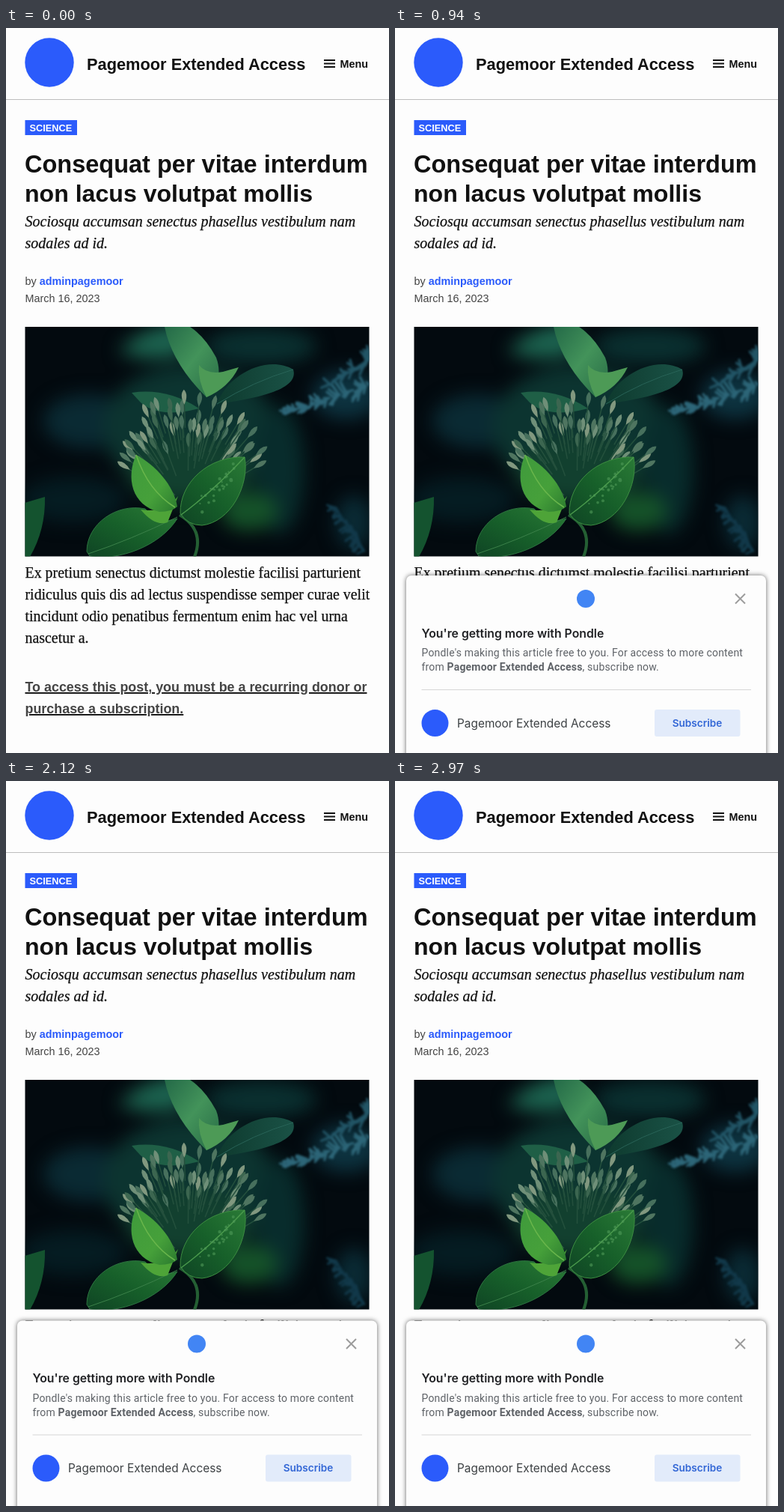
An HTML page that plays this animation: 512 px wide and 968 px high, repeating every 3 s.

```html
<!DOCTYPE html>
<html lang="en">
<head>
<meta charset="utf-8">
<title>Extended access prompt</title>
<style>
  html, body { margin: 0; width: 100%; height: 100%; overflow: hidden; background: #fdfdfd; }
  svg { display: block; }
  text { fill: #111; font: 14.4px "Liberation Sans", Arial, sans-serif; white-space: pre; }
  .b { font-weight: 700; }
  .serif { font: 19.9px "Liberation Serif", Georgia, serif; stroke: #111; stroke-width: .25; }
  .lead { font-size: 20px; font-style: italic; }
  .note { font: 14px Roboto, sans-serif; letter-spacing: .18px; fill: #5f6368; }
  .ui { font: 600 15.8px Inter, sans-serif; fill: #202124; }
  .soft { filter: blur(12px); }
  .hazy { filter: blur(1.8px); }
  #panel { filter: drop-shadow(0 0 3px rgba(0,0,0,.6)); }
  #bubble { filter: drop-shadow(0 0 9px rgba(0,0,0,.13)); }
</style>
</head>
<body>
<svg width="512" height="968" viewBox="0 0 512 968">
  <defs>
    <clipPath id="frame"><rect x="25.5" y="399" width="460" height="306.5"/></clipPath>
    <linearGradient id="bright" x2="1" y2="1"><stop stop-color="#3f9a3c"/><stop offset=".6" stop-color="#46a03a"/><stop offset="1" stop-color="#2a7a2e"/></linearGradient>
    <linearGradient id="deep" x1="1" y1="0" x2="0" y2="1"><stop stop-color="#2a7a36"/><stop offset=".5" stop-color="#17602a"/><stop offset="1" stop-color="#0f4424"/></linearGradient>
    <linearGradient id="pale" x2="1" y2="1"><stop stop-color="#246a48"/><stop offset=".5" stop-color="#43935a"/><stop offset="1" stop-color="#276b45"/></linearGradient>
    <linearGradient id="dusk" x2="1"><stop stop-color="#0e3a2e"/><stop offset="1" stop-color="#1a5246"/></linearGradient>
  </defs>

  <!-- header -->
  <circle cx="58" cy="46" r="32.7" fill="#2b5bfb"/>
  <text class="b" x="108" y="56" style="font-size:21.8px">Pagemoor Extended Access</text>
  <path d="M425 43h15M425 47.5h15M425 52h15" stroke="#111" stroke-width="1.8"/>
  <text class="b" x="446.5" y="53">Menu</text>
  <path d="M0 95.5H512" stroke="#bdbdbd"/>

  <!-- article -->
  <rect x="25.5" y="123" width="69.5" height="20" fill="#2b5bfb"/>
  <text class="b" x="31.5" y="138" style="font-size:12.8px;fill:#fff">SCIENCE</text>
  <text class="b" x="25" y="193" style="font-size:32.5px">Consequat per vitae interdum</text>
  <text class="b" x="25" y="232" style="font-size:32.1px">non lacus volutpat mollis</text>
  <text class="serif lead" x="25.5" y="265">Sociosqu accumsan senectus phasellus vestibulum nam</text>
  <text class="serif lead" x="25.5" y="294">sodales ad id.</text>
  <text x="25.5" y="343" style="fill:#444">by <tspan class="b" fill="#2b5bfb">adminpagemoor</tspan></text>
  <text x="25.5" y="366" style="fill:#444">March 16, 2023</text>

  <!-- plant picture -->
  <g clip-path="url(#frame)">
    <rect x="25" y="399" width="462" height="308" fill="#030a0f"/>
    <g class="soft">
      <ellipse cx="110" cy="525" rx="60" ry="36" fill="#0a2a33"/>
      <ellipse cx="90" cy="630" rx="70" ry="30" fill="#051c22"/>
      <ellipse cx="245" cy="535" rx="115" ry="85" fill="#0c3430"/>
      <ellipse cx="245" cy="590" rx="85" ry="45" fill="#12402f"/>
      <ellipse cx="365" cy="590" rx="34" ry="85" fill="#082c2c"/>
      <ellipse cx="325" cy="645" rx="38" ry="26" fill="#155229"/>
      <ellipse cx="340" cy="425" rx="75" ry="24" fill="#0a3030"/>
      <ellipse cx="455" cy="490" rx="45" ry="32" fill="#0d3340"/>
      <ellipse cx="465" cy="660" rx="24" ry="36" fill="#0a2b35"/>
      <path d="M150 432Q190 392 240 396L242 434Q200 450 150 432Z" fill="#1c6450"/>
    </g>
    <g id="sprigs" class="hazy" stroke-width="3" stroke-linecap="round"></g>
    <path d="M25 634L52 626Q53 670 32 706H25Z" fill="#14532f"/>
    <path d="M212 399Q222 448 268 493Q292 470 281 440Q266 412 246 399Z" fill="url(#pale)"/>
    <path d="M258 450Q268 463 290 459L311 453Q298 480 268 493Q256 470 258 450Z" fill="#4d9a56"/>
    <path d="M282 502C296 462 350 436 384 456C392 482 340 494 282 502Z" fill="url(#dusk)"/>
    <path d="M282 502Q330 472 384 456" fill="none" stroke="#286357"/>
    <path d="M168 487Q215 480 258 508Q205 522 180 500Z" fill="#1f5f46"/>
    <g id="buds"></g>
    <path d="M232 650Q266 670 252 706" fill="none" stroke="#245f33" stroke-width="4"/>
    <path d="M108 699C108 662 148 634 186 642Q205 664 229 655C206 692 150 712 112 705Z" fill="url(#deep)" stroke="#2d7440"/>
    <path d="M110 702Q165 684 229 653" fill="none" stroke="#3b8149"/>
    <path d="M180 643Q199 666 216 660L230 625Q214 648 180 643Z" fill="#4ea438"/>
    <path d="M174 570C160 600 168 638 205 646Q222 646 229 639C224 610 200 584 174 570Z" fill="url(#bright)"/>
    <path d="M174 570Q190 618 226 640" fill="none" stroke="#69b64b" stroke-width="1.5"/>
    <path d="M233 648C232 608 270 571 319 573C326 610 300 660 262 664Q243 664 233 648Z" fill="url(#deep)" stroke="#3c8d40"/>
    <path d="M234 650Q275 620 319 573" fill="none" stroke="#4a9a4c" stroke-width="1.5"/>
    <g id="drops" fill="#4f9a58" opacity=".6"></g>
  </g>

  <g>
    <text class="serif" x="25.5" y="734">Ex pretium senectus dictumst molestie facilisi parturient</text>
    <text class="serif" x="25.5" y="763">ridiculus quis dis ad lectus suspendisse semper curae velit</text>
    <text class="serif" x="25.5" y="792">tincidunt odio penatibus fermentum enim hac vel urna</text>
    <text class="serif" x="25.5" y="821">nascetur a.</text>
  </g>
  <g text-decoration="underline">
    <text class="b" x="25.5" y="886" style="font-size:17.9px;fill:#444">To access this post, you must be a recurring donor or</text>
    <text class="b" x="25.5" y="915" style="font-size:17.9px;fill:#444">purchase a subscription.</text>
  </g>

  <!-- sheet, drawn from its own top edge -->
  <g id="sheet">
    <rect id="panel" x="15" y="0" width="481" height="300" rx="7" fill="#fdfdfd"/>
    <path id="spinner" d="M261.3 68.7A12.5 12.5 0 0 1 268.5 80" fill="none" stroke="#3f7be0" stroke-width="3"/>
    <g id="offer">
      <circle cx="255" cy="31" r="12" fill="#4285f4"/>
      <path d="M455 24.5l13 13m0-13l-13 13" stroke="#9c9c9c" stroke-width="2"/>
      <text class="ui" x="35.5" y="82.5">You're getting more with Pondle</text>
      <text class="note" x="35.5" y="108">Pondle's making this article free to you. For access to more content</text>
      <text class="note" x="35.5" y="127">from <tspan class="b">Pagemoor Extended Access</tspan>, subscribe now.</text>
      <path d="M35.5 152.5H476" stroke="#d6d6d6"/>
      <circle cx="53.5" cy="197" r="18" fill="#2b5bfb"/>
      <text class="ui" x="83" y="202.5" style="font-size:15.4px;font-weight:400;fill:#3c4043">Pagemoor Extended Access</text>
      <rect x="347" y="179" width="114.5" height="36" rx="3" fill="#e2ebfa"/>
      <text class="ui" x="404" y="201.5" text-anchor="middle" style="font-size:13.6px;fill:#3367d6">Subscribe</text>
    </g>
  </g>

  <g id="status">
    <path id="bubble" d="M-20 926.5H160Q167.5 926.5 167.5 934V990H-20Z" fill="#7a9fe6" stroke="#2c3a55"/>
    <text x="10.5" y="956" style="font:22.6px Inter,sans-serif;fill:#1d2433">Waiting for...</text>
  </g>
</svg>
<script>
  const $ = id => document.getElementById(id);
  let seed = 7;
  const rand = () => (seed = seed * 16807 % 2147483647) / 2147483647;

  // Tapered buds on thin stems fan out from the heart of the plant.
  function buds() {
    const shades = ['#6f8f78', '#4f7560', '#3c6650', '#81987f', '#47705d'];
    let out = '';
    for (let i = 0; i < 72; i++) {
      const a = Math.PI * (1.04 + .92 * (i * .618 % 1));
      const r = .38 + .52 * rand();
      const x = 243 + 122 * r * Math.cos(a), y = 602 + 125 * r * Math.sin(a);
      const turn = Math.atan2(y - 640, x - 243) * 180 / Math.PI;
      out += `<g transform="translate(${x} ${y}) rotate(${turn})">
        <path d="M-40 0H0" stroke="#24503d" stroke-width="1.5"/>
        <path d="M-9 0Q4 -6.5 11 0Q4 6.5 -9 0Z" fill="${shades[i % 5]}"/></g>`;
    }
    return out;
  }

  // Needles spread around a branch.
  function sprig(x, y, x2, y2, count, color) {
    let out = '';
    for (let i = 0; i < count; i++) {
      const k = rand(), spread = 6 + 14 * k;
      const px = x + (x2 - x) * k, py = y + (y2 - y) * k;
      out += `<path d="M${px} ${py}l${-3 - 8 * rand()} ${(rand() - .5) * 2 * spread}" stroke="${color}"/>`;
    }
    return out;
  }

  function drops() {
    let out = '';
    for (let i = 0; i < 26; i++) {
      const k = rand();
      out += `<circle cx="${250 + 52 * k + 14 * rand()}" cy="${640 - 52 * k + 18 * (rand() - .5)}" r="${1 + 1.4 * rand()}"/>`;
    }
    return out;
  }

  $('buds').innerHTML = buds();
  $('sprigs').innerHTML = sprig(374, 514, 486, 476, 65, '#2d6678')
    + sprig(425, 480, 490, 440, 35, '#225566') + sprig(440, 640, 480, 700, 35, '#12394a');
  $('drops').innerHTML = drops();

  const ramp = (t, from, to) => Math.min(1, Math.max(0, (t - from) / (to - from)));
  const smooth = k => k * k * (3 - 2 * k);

  function draw() {
    const t = performance.now() % 3000;
    const enter = 1 - (1 - ramp(t, 60, 300)) ** 3;
    const grow = smooth(ramp(t, 575, 1035));
    $('sheet').setAttribute('transform', `translate(0 ${975 - 157 * enter - 97.5 * grow})`);
    $('spinner').setAttribute('transform', `rotate(${(t - 390) * .4} 256 80)`);
    $('spinner').style.opacity = 1 - ramp(t, 540, 600);
    $('offer').style.opacity = ramp(t, 560, 640);
    $('status').style.opacity = Math.min(ramp(t, 150, 250), 1 - ramp(t, 600, 750));
    requestAnimationFrame(draw);
  }
  draw();
</script>
</body>
</html>
```
